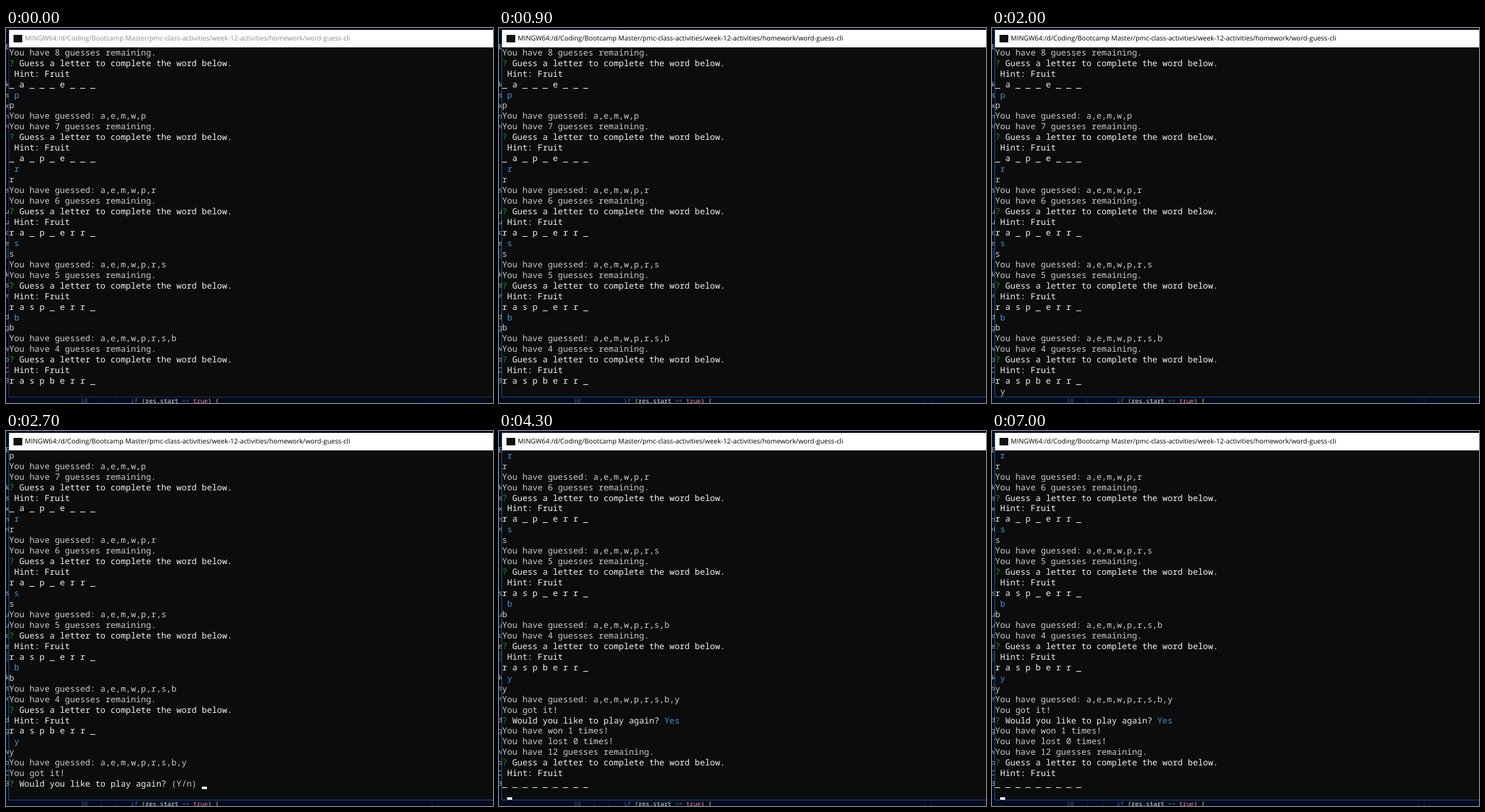
An HTML page that plays this animation: 778x600 px, repeating every 7.1 s.

```html
<!DOCTYPE html>
<html lang="en">
<head>
<meta charset="utf-8">
<title>Word guess</title>
<style>
  html, body { margin: 0; width: 778px; height: 600px; overflow: hidden; background: #030a1e; }
  #stage { position: relative; width: 778px; height: 600px; overflow: hidden; text-rendering: geometricPrecision; }
  #stage div { position: absolute; white-space: pre; }
  .side { left: 0; width: 5px; height: 17px; overflow: hidden; direction: rtl; font: 11px/17px "Noto Sans", sans-serif; color: #a3adb8; }
  .code { top: 590px; font: 9.8px/14px "Noto Sans Mono", monospace; color: #d6deeb; }
  .guide { top: 591px; width: 1px; height: 9px; background: #14213a; }
  #win { left: 4px; top: 3px; width: 790px; height: 587px; background: #0c0c0c; border: solid #1a5a8c; border-width: 0 0 1px 1px; }
  #bar { left: 0; top: 0; width: 790px; height: 28px; background: #fff; }
  #icon { left: 7px; top: 8px; width: 14px; height: 12px; background: #111; }
  #title { left: 25px; top: 6px; font: 10.7px/17px "Open Sans", sans-serif; color: #000; }
  #view { left: 0; top: 28px; width: 780px; height: 559px; overflow: hidden; }
  #text { left: 0; top: -0.3px; font: 500 13.5px/16.95px "Noto Sans Mono", monospace; color: #ccc; }
  #cursor { width: 8px; height: 4px; background: #f2f2f2; }
  .idle #title { color: #8c8c8c; }
  .idle #win { border-color: #2a3342; }
  .w { color: #f2f2f2; }
  .g { color: #13a10e; }
  .b { color: #3a96dd; }
</style>
</head>
<body>
<div id="stage">
  <div style="left:0;top:0;width:190px;height:3px;background:#070d28"></div>
  <div style="left:0;top:352px;width:4px;height:17px;background:#10263d"></div>
  <div class="code" style="left:119px;color:#35587f">38</div>
  <div class="code" style="left:199px"><span style="color:#3f5f9c">if</span> <span style="color:#e8d44d">(</span>res.start <span style="color:#3d6b78">==</span> <span style="color:#f07a92">true</span><span style="color:#e8d44d">) {</span></div>
  <div class="guide" style="left:152px"></div>
  <div class="guide" style="left:176px"></div>
  <div class="guide" style="left:680px"></div>
  <div class="guide" style="left:690px"></div>
  <div id="win">
    <div id="view"><div id="text"></div><div id="cursor"></div></div>
    <div id="bar"><div id="icon"></div><div id="title">MINGW64:/d/Coding/Bootcamp Master/pmc-class-activities/week-12-activities/homework/word-guess-cli</div></div>
  </div>
</div>
<script>
const LOOP = 7100, ROW = 16.95, COL = 8.1;
const FOCUS = 500, TYPED = 1700, SOLVED = 2100, AGAIN = 4300;
const BLINK = [[1300, 1600], [2500, 3100], [3600, 5070], [5600, 6130], [6660, LOOP]];
const STAGES = [
  { scroll: 0, row: 32, col: 1 },
  { scroll: 5, row: 36, col: 38 },
  { scroll: 11, row: 43, col: 1 }
];
const $ = id => document.getElementById(id);
const stage = $('stage'), text = $('text'), cursor = $('cursor');

// Clipped ends of the editor's file list behind the window
const sides = { 31: 'E', 91: 'k', 108: 'js', 125: 'x', 142: 'm', 158: 'vi', 260: 'ss', 294: 'u', 311: 'u', 328: 'oc',
  345: 'e', 395: 'k', 412: 'js', 429: 'rr', 463: 'd', 480: 'ng', 514: 'w', 531: 'ub', 548: 'C', 565: '03' };
for (const [y, s] of Object.entries(sides)) {
  const el = document.createElement('div');
  el.className = 'side';
  el.style.top = y - 9 + 'px';
  el.textContent = s;
  stage.insertBefore(el, $('win'));
}

const span = (cls, s) => `<span class="${cls}">${s}</span>`;
const ask = s => span('g', '?') + span('w', ' ' + s);

function prompt(left, pattern) {
  return [`You have ${left} guesses remaining.`, ask('Guess a letter to complete the word below.'),
    span('w', ' Hint: Fruit'), span('w', pattern)];
}

function buffer(n, typed) {
  const known = [...'aemw'], lines = [];
  [...'prsby'].forEach((key, i) => {
    const mask = [...'raspberry'].map(c => known.includes(c) ? c : '_').join(' ');
    lines.push(...prompt(8 - i, mask));
    if (key === 'y' && n === 0) {
      lines.push(typed ? ' y' : '');
      return;
    }
    known.push(key);
    lines.push(span('b', ' ' + key), key, 'You have guessed: ' + known.join());
  });
  if (n > 0) lines.push('You got it!', ask('Would you like to play again? ') + (n === 1 ? '(Y/n) ' : span('b', 'Yes')));
  if (n > 1) lines.push('You have won 1 times!', 'You have lost 0 times!', ...prompt(12, Array(9).fill('_').join(' ')));
  return lines.slice(STAGES[n].scroll).join('\n');
}

let shown = '';
function draw(t) {
  const n = t < SOLVED ? 0 : t < AGAIN ? 1 : 2;
  const typed = n === 0 && t >= TYPED;
  const key = n + ':' + typed;
  if (key !== shown) {
    text.innerHTML = buffer(n, typed);
    shown = key;
  }
  const { scroll, row, col } = STAGES[n];
  stage.classList.toggle('idle', t < FOCUS);
  cursor.style.left = Math.round((typed ? col + 1 : col) * COL) + 'px';
  cursor.style.top = Math.round((row - scroll) * ROW + 12.7) + 'px';
  cursor.style.visibility = BLINK.some(([a, b]) => t >= a && t < b) ? 'visible' : 'hidden';
}

function tick() {
  draw(performance.now() % LOOP);
  requestAnimationFrame(tick);
}
tick();
</script>
</body>
</html>
```
